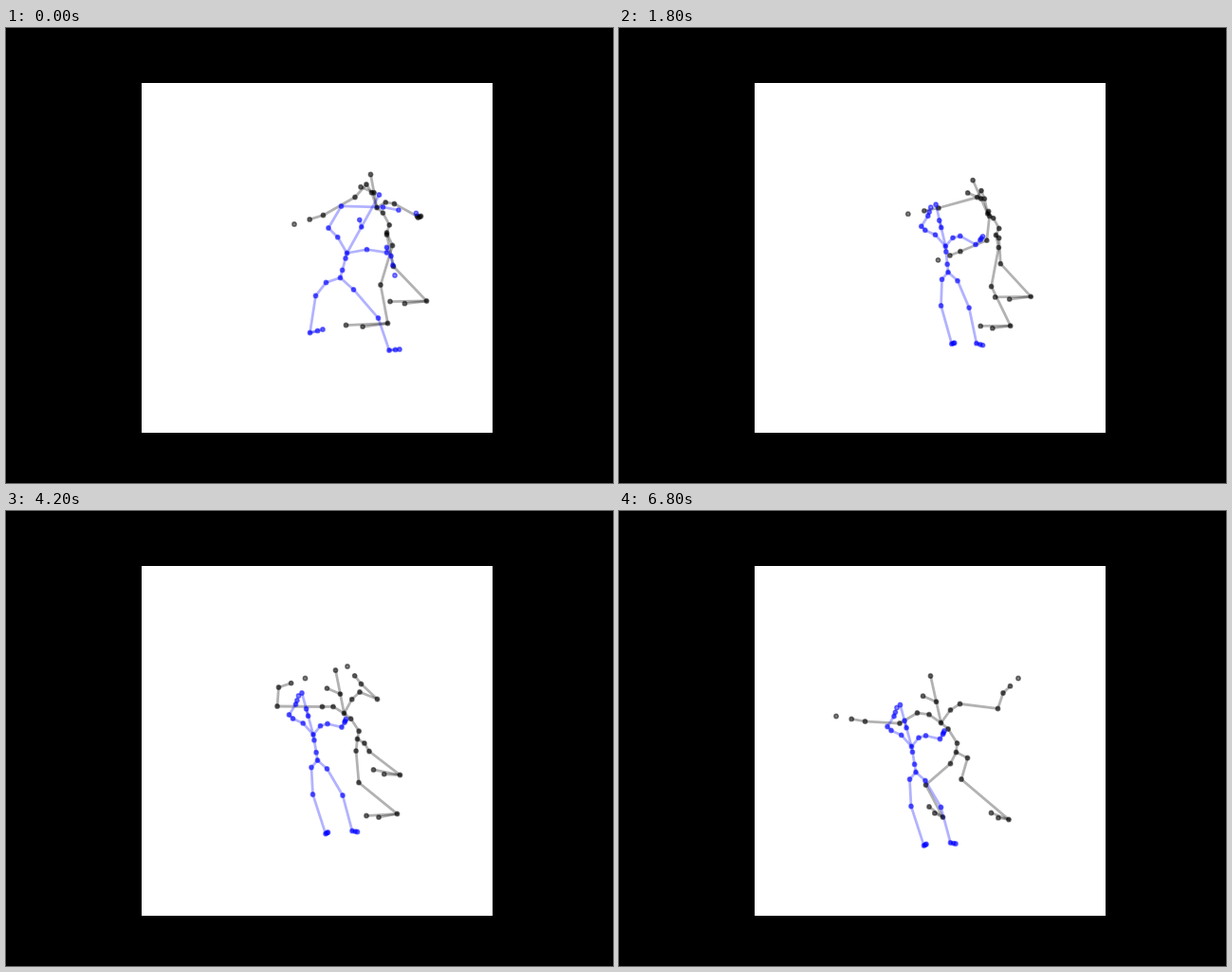
These frames come from a looping animation (640 px wide and 480 px high, 6900 ms). An HTML page with a canvas:

```html
<!DOCTYPE html>
<html>
<head>
<meta charset="utf-8">
<title>Two figures</title>
<style>
html, body { margin: 0; height: 100%; overflow: hidden; background: #000; }
canvas { display: block; }
</style>
</head>
<body>
<canvas id="stage" width="640" height="480"></canvas>
<script>
const ctx = document.getElementById('stage').getContext('2d');
const LOOP = 6900, STEP = 100;

// Keys map a time in ms to x, y pairs. The root is a place on the stage; the spine holds
// neck from root and crown from neck; arms (shoulder, elbow, wrist, tip) are measured from
// the neck, hips and legs (knee, ankle, toe) from the root. Other joints follow by rule.
const dark = {
  color: '0,0,0', bow: 6, nod: [-14, -6],
  root: { 0: [401,215.5], 2500: [394.5,219.5], 4200: [370,240], 5200: [358,253], 6800: [355,254] },
  spine: {
    0: [-10.5,-26.5, -6.5,-35],
    2500: [-8.5,-22, -17,-35.5],
    4200: [-14,-27, -9,-45.5],
    5200: [-10,-30, -7,-52],
    6800: [-16,-31, -11,-49.5]
  },
  hips: { 0: [6,13.5, 0,2], 6800: [-6,12, 12,6] },
  arms: [{
    0: [18.5,-4, 42.5,9, 46.5,9, 43.5,10.5],
    1100: [9,0, 9.5,27.5, -13,38, -32,41],
    2500: [-5,4, -11,28.5, -41,40.5, -61.5,52.5],
    3500: [-13,-1, -38,11.5, -59,7.5, -62,-16],
    4200: [-23,-7, -70.5,-7.5, -69,-27.5, -41,-37],
    5200: [-24.5,-8.5, -55.5,-3, -90.5,-24.5, -95,-47.5],
    5600: [-26,-9.5, -70,-1, -114,-10, -148,-19],
    6300: [-25,-10.5, -43.5,.5, -80,-1.5, -110.5,-7]
  }, {
    1100: [-11,-24.5, -23,-11, -56.5,8, -87,17.5],
    2500: [-2,-24, -2,-21, -46,-18.5, -79.5,-17.5],
    3500: [7,-23, 2,-16, -28,-31, -51,-46.5],
    4200: [16.5,-22.5, 35,-15, 18,-31, 3.5,-49.5],
    6800: [20,-20, 60,-15, 65.5,-31.5, 81.5,-47]
  }],
  legs: [{
    0: [-6.5,55, 1,95.5, -43,97.5],
    1100: [-5.5,55.5, 16,97, -15,98.5],
    2500: [-4,52, 14.5,93, -17.5,91.5],
    4200: [1.5,46, 42,79, 9.5,81],
    5200: [-24,42, -10,75, -23,66],
    6800: [-32,34.5, -14,68.5, -28.5,57.5]
  }, {
    0: [7,35.5, 42,72, 3.5,72.5],
    2500: [4.5,27.5, 36,61, -1.5,61.5],
    4200: [12.5,13, 45,38, 17,32.5],
    5200: [7,29, 41.5,67.5, 18.5,63],
    6800: [5.5,28.5, 55.5,71, 37,64]
  }]
};

const blue = {
  color: '0,0,255', bow: 0, nod: [-2, -7.5],
  root: { 0: [352,263], 1100: [351,257.5], 2500: [340,257], 4200: [328,262.5], 6800: [312.5,275] },
  spine: { 0: [7,-26, 34,-61.5], 1100: [-1,-27.5, -8,-44], 2800: [-4.5,-27, -12,-44] },
  hips: { 0: [-15,5, 14,12.5], 1100: [-6.5,7.5, 10,9] },
  arms: [{
    0: [-19.5,-26.5, -6,-49.5, 38,-48.5, 73,-42],
    1100: [-21.5,-17, -25.5,-21, -18.5,-32, -15.5,-41]
  }, {
    0: [42,-.5, 42,-6, 46.5,3, 50.5,23.5],
    1100: [16,-10, 33.5,.5, 39.5,-2.5, 43,-4.5],
    2800: [15,-11.5, 30,-8, 33,-13, 34.5,-16.5]
  }],
  legs: [{
    0: [-26,19, -32,58, -18.5,54.5],
    1100: [-10,34.5, -1,73.5, 2.5,73],
    2800: [-5,36, 8.5,77.5, 11,76]
  }, {
    0: [40,42.5, 51.5,76.5, 62.5,75.5],
    1100: [20.5,38, 27.5,75.5, 34.5,77.5],
    2800: [26.5,37, 36.5,74.5, 42,75.5]
  }]
};

const add = ([x, y], [dx, dy]) => [x + dx, y + dy];
const mix = (a, b, u) => [a[0] + (b[0] - a[0]) * u, a[1] + (b[1] - a[1]) * u];

// Monotone cubic through the keys, held before the first and after the last.
function sample(keys, time, origin = [0, 0]) {
  const times = Object.keys(keys).map(Number), poses = Object.values(keys);
  const last = times.length - 1;
  const t = Math.min(Math.max(time, times[0]), times[last]);
  let k = 0;
  while (k < last - 1 && t >= times[k + 1]) k++;
  const h = times[k + 1] - times[k], u = (t - times[k]) / h, v = 1 - u;
  const slope = (i, c) => (poses[i + 1][c] - poses[i][c]) / (times[i + 1] - times[i]);
  const tangent = (i, c) => {
    const a = slope(Math.max(i - 1, 0), c), b = slope(Math.min(i, last - 1), c);
    return a * b > 0 ? 2 * a * b / (a + b) : 0;
  };
  const flat = poses[k].map((p, c) => p + (poses[k + 1][c] - p) * u * u * (3 - 2 * u)
    + h * u * v * (tangent(k, c) * v - tangent(k + 1, c) * u));
  const points = [];
  for (let i = 0; i < flat.length; i += 2) points.push(add(origin, [flat[i], flat[i + 1]]));
  return points;
}

function drawFigure({ color, bow, nod, root: path, spine, hips, arms, legs }, t) {
  const [root] = sample(path, t);
  const [neck, up] = sample(spine, t);
  const neckAt = add(root, neck), crown = add(neckAt, up);
  const joints = [root];

  function chain(start, ...points) {
    let from = start;
    for (const to of points) {
      ctx.beginPath();
      ctx.moveTo(...from);
      ctx.lineTo(...to);
      ctx.stroke();
      joints.push(to);
      from = to;
    }
  }

  ctx.strokeStyle = `rgba(${color},.3)`;
  ctx.lineWidth = 2.78;
  ctx.lineCap = 'square';

  const skull = mix(neckAt, crown, .45);
  const waist = add(mix(root, neckAt, .31), [bow, 0]);
  const chest = add(mix(root, neckAt, .79), [bow * .7, 0]);
  chain(root, waist, chest, neckAt, skull, crown);
  chain(skull, add(skull, nod));

  for (const arm of arms) {
    const [shoulder, elbow, wrist, tip] = sample(arm, t, neckAt);
    const collar = add(mix(neckAt, shoulder, .5), [0, -3.6]);
    chain(neckAt, collar, shoulder, elbow, wrist, mix(wrist, tip, .47));
    joints.push(tip);
  }

  const hipsAt = sample(hips, t, root);
  legs.forEach((leg, i) => {
    const [knee, ankle, toe] = sample(leg, t, root);
    chain(root, hipsAt[i], knee, ankle, toe);
    chain(ankle, add(mix(ankle, toe, .6), [0, bow * .4]));
  });

  ctx.strokeStyle = ctx.fillStyle = `rgba(${color},.5)`;
  ctx.lineWidth = 1.39;
  for (const [x, y] of joints) {
    ctx.beginPath();
    ctx.arc(x, y, 2.2, 0, 2 * Math.PI);
    ctx.fill();
    ctx.stroke();
  }
}

function frame() {
  const t = Math.floor(performance.now() % LOOP / STEP) * STEP;
  ctx.setTransform(1, 0, 0, 1, 0, 0);
  ctx.fillStyle = '#000';
  ctx.fillRect(0, 0, 640, 480);
  ctx.fillStyle = '#fff';
  ctx.fillRect(143, 58, 370, 369);
  ctx.translate(.5, .5);
  drawFigure(dark, t);
  drawFigure(blue, t);
  requestAnimationFrame(frame);
}
frame();
</script>
</body>
</html>
```
